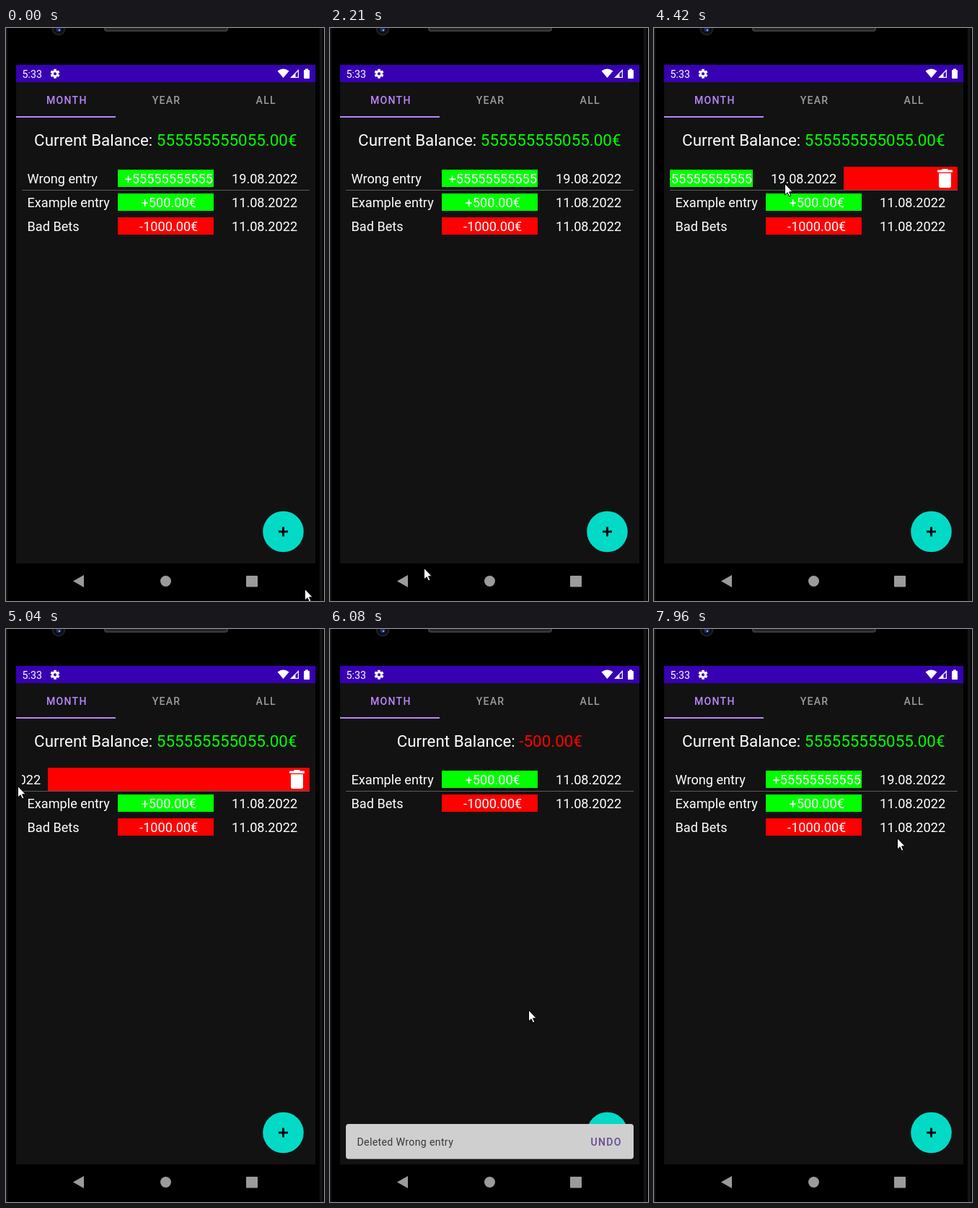
Animation, 441 px wide and 793 px high, one loop 8000 ms. Source, as an HTML page with a canvas:

```html
<!DOCTYPE html>
<html lang="en">
<head>
<meta charset="utf-8">
<title>Budget list</title>
<style>
  html, body { margin: 0; width: 100%; height: 100%; overflow: hidden; background: #000; }
  canvas { display: block; width: 441px; height: 793px; }
</style>
</head>
<body>
<canvas id="stage" width="441" height="793"></canvas>
<script>
const ctx = document.getElementById('stage').getContext('2d');
const LOOP = 8000;
const GREEN = '#00ff00', RED = '#ff0000', PURPLE = '#3700b3';
const BG = '#121212', GREY = '#9b9b9b';

// Timeline in ms
const LEAVE = 1670, ENTER = 2210;
const RELEASE = 4980, REMOVED = 5115, SHIFT_UP = 5243;
const UNDO = 6700, SHIFT_DOWN = 6742, FADE_IN = 6992;
const MOVE = 250, FADE = 120;

const LIST = { x: 22, y: 192, w: 399, row: 33 };
const WRONG = ['Wrong entry', '+55555555555', '19.08.2022', GREEN];
const EXAMPLE = ['Example entry', '+500.00€', '11.08.2022', GREEN];
const BETS = ['Bad Bets', '-1000.00€', '11.08.2022', RED];

// Pointer strokes: start, end, target x, target y, vertical bow
const HOME = [414, 776];
const STROKES = [
  [20, 710, 67, 770, -65],
  [1190, 1500, 85, 790, 0],
  [LEAVE, LEAVE + 1, 130, 747, 0],
  [ENTER, 2330, 183, 211, 0],
  [2730, 3290, 307, 210, -8],
  [3497, 3630, 343, 210, 0],
  [3780, 5070, 16, 217, 2],
  [5070, 5470, 152, 328, 26],
  [5730, 6410, 386, 707, 0],
  [7690, 7960, 337, 289, 0]
];

const clamp = v => Math.max(0, Math.min(1, v));
const phase = (t, start, span) => clamp((t - start) / span);
const ease = v => (1 - Math.cos(Math.PI * v)) / 2;
const mix = (a, b, k) => a + (b - a) * k;

function rect(x, y, w, h, color) {
  ctx.fillStyle = color;
  ctx.fillRect(x, y, w, h);
}

function round(x, y, w, h, r, color) {
  ctx.fillStyle = color;
  ctx.beginPath();
  ctx.roundRect(x, y, w, h, r);
  ctx.fill();
}

function disc(x, y, r, color) {
  ctx.fillStyle = color;
  ctx.beginPath();
  ctx.arc(x, y, r, 0, Math.PI * 2);
  ctx.fill();
}

function poly(points, color) {
  ctx.fillStyle = color;
  ctx.beginPath();
  points.forEach(p => ctx.lineTo(p[0], p[1]));
  ctx.closePath();
  ctx.fill();
}

function text(str, x, y, size, color, { align = 'left', weight = 400, spacing = 0 } = {}) {
  ctx.font = `${weight} ${size}px Roboto, sans-serif`;
  ctx.letterSpacing = spacing + 'px';
  ctx.textAlign = align;
  ctx.fillStyle = color;
  ctx.fillText(str, x, y);
}

function textWidth(str, size) {
  ctx.font = `400 ${size}px Roboto, sans-serif`;
  ctx.letterSpacing = '0px';
  return ctx.measureText(str).width;
}

function pointerAt(t) {
  let [x, y] = HOME;
  for (const [start, end, toX, toY, bow] of STROKES) {
    if (t <= start) break;
    const k = phase(t, start, end - start);
    x = mix(x, toX, ease(k));
    y = mix(y, toY, ease(k)) + bow * Math.sin(Math.PI * k);
  }
  return [x, y];
}

function drawPhone() {
  rect(0, 0, 441, 793, '#000');
  rect(0, 0, 2, 793, '#151515');
  rect(435, 0, 4, 793, '#141414');
  disc(73, 1, 9.5, '#1d1d20');
  disc(73, 1, 7, '#0b0c16');
  disc(73, 2, 3.5, '#1d2c63');
  disc(74, 3, 1.3, '#8ea6dd');
  round(136, -6, 172, 11, 4, '#3a3a3a');
  round(138, -6, 168, 9, 3, '#242424');
}

function drawGear(x, y) {
  ctx.save();
  ctx.translate(x, y);
  for (let i = 0; i < 6; i++) {
    rect(-1.8, -6.5, 3.6, 4, '#fff');
    ctx.rotate(Math.PI / 3);
  }
  disc(0, 0, 4.8, '#fff');
  disc(0, 0, 2.1, PURPLE);
  ctx.restore();
}

function drawStatusBar() {
  rect(14, 51, 415, 24, PURPLE);
  text('5:33', 22.5, 69, 14.2, '#fff');
  drawGear(68, 63.3);
  ctx.fillStyle = '#fff';
  ctx.beginPath();
  ctx.moveTo(384.5, 69);
  ctx.lineTo(376.5, 59.5);
  ctx.quadraticCurveTo(384.5, 53.5, 392.5, 59.5);
  ctx.fill();
  poly([[406, 57], [406, 69], [394, 69]], '#fff');
  poly([[404.8, 60], [404.8, 67.8], [401.5, 67.8], [401.5, 63.2]], PURPLE);
  round(413, 58, 8, 12, 1, '#fff');
  rect(415, 56.5, 4, 2, '#fff');
}

function drawTabs() {
  rect(14, 75, 415, 666, BG);
  ['MONTH', 'YEAR', 'ALL'].forEach((label, i) => {
    const color = i ? GREY : '#bb86fc';
    text(label, 84.3 + i * 138.2, 105, 14.1, color, { align: 'center', weight: 500, spacing: 1.25 });
  });
  rect(14, 122, 138, 2, '#bb86fc');
}

function drawBalance(amount, color) {
  const label = 'Current Balance: ', size = 22.4;
  const labelW = textWidth(label, size);
  const x = 221.3 - (labelW + textWidth(amount, size)) / 2;
  text(label, x, 163, size, '#fff');
  text(amount, x + labelW, 163, size, color);
}

function drawRow([name, amount, date, color], y, dx = 0, alpha = 1) {
  const base = y + 23, size = 18.15;
  ctx.globalAlpha = alpha;
  text(name, 29.5 + dx, base, size, '#fff');
  rect(155 + dx, y + 4, 133, 24, color);
  text(amount, 225.7 + dx, base, size, '#fff', { align: 'center' });
  text(date, 313 + dx, base, size, '#fff');
  ctx.globalAlpha = 1;
}

function drawTrash() {
  round(399, 195, 9, 4, 1.5, '#fff');
  round(393, 196.5, 21, 3.2, 1, '#fff');
  round(395, 201, 17, 20, [0, 0, 2.5, 2.5], '#fff');
}

function swipeOffset(t) {
  if (t < 3780) return 0;
  const drag = Math.min(0, pointerAt(Math.min(t, RELEASE))[0] - 332);
  return mix(drag, -LIST.w, phase(t, RELEASE, FADE));
}

function drawList(t) {
  const { x, y, w, row } = LIST;
  const removed = t >= REMOVED && t < UNDO;
  const up = ease(phase(t, SHIFT_UP, MOVE)) - ease(phase(t, SHIFT_DOWN, MOVE));
  const second = Math.round(y + row * (1 - up));

  ctx.save();
  ctx.beginPath();
  ctx.rect(x, y, w, removed ? 68 : 101);
  ctx.clip();

  if (t < SHIFT_UP) {
    const dx = Math.round(swipeOffset(t));
    if (dx < 0) {
      const left = Math.max(x, 414 + dx);
      rect(left, y, x + w - left, row, RED);
      if (left < 393) drawTrash();
    }
    if (t < REMOVED) drawRow(WRONG, y, dx);
  } else if (t >= FADE_IN) {
    drawRow(WRONG, y, 0, phase(t, FADE_IN, FADE));
  }
  drawRow(EXAMPLE, second);
  drawRow(BETS, second + row);
  rect(x, (removed ? second : y) + 32, w, 1, '#5c5c5c');
  ctx.restore();
}

function drawFab() {
  disc(384.5, 697, 28.3, '#03dac5');
  rect(378, 695.6, 13, 2.8, '#000');
  rect(383.1, 690.5, 2.8, 13, '#000');
}

function drawSnackbar(t) {
  const shown = phase(t, REMOVED, 150);
  const alpha = shown * (1 - phase(t, UNDO, 75));
  if (!alpha) return;
  const scale = mix(0.8, 1, 1 - (1 - shown) ** 3);
  ctx.save();
  ctx.globalAlpha = alpha;
  ctx.translate(221.5, 709);
  ctx.scale(scale, scale);
  ctx.translate(-221.5, -709);
  round(22, 685, 399, 48.5, 4, '#cfcfcf');
  text('Deleted Wrong entry', 37.5, 714.5, 14.1, '#383838', { spacing: 0.36 });
  text('UNDO', 361.5, 714.5, 14.1, '#664b91', { weight: 500, spacing: 1.25 });
  ctx.restore();
}

function drawNavBar() {
  rect(14, 741, 415, 52, '#000');
  poly([[93, 765.5], [108, 757], [108, 774]], GREY);
  disc(221.5, 765.5, 7.5, GREY);
  round(333, 758, 16, 15.5, 1, GREY);
}

function drawPointer(t) {
  if (t >= LEAVE && t < ENTER) return;
  const [x, y] = pointerAt(t).map(Math.round);
  ctx.save();
  ctx.translate(x + 0.5, y + 0.5);
  poly([[0, 0], [0, 15.5], [3.6, 12.2], [6, 17.5], [8.4, 16.5], [6.1, 11.3], [10.8, 11.3]], '#fff');
  ctx.strokeStyle = '#000';
  ctx.lineWidth = 1;
  ctx.stroke();
  ctx.restore();
}

function frame(now) {
  const t = now % LOOP;
  drawPhone();
  drawStatusBar();
  drawTabs();
  if (t >= REMOVED && t < UNDO) drawBalance('-500.00€', RED);
  else drawBalance('555555555055.00€', GREEN);
  drawList(t);
  drawFab();
  drawSnackbar(t);
  drawNavBar();
  drawPointer(t);
  requestAnimationFrame(frame);
}
requestAnimationFrame(frame);
</script>
</body>
</html>
```
